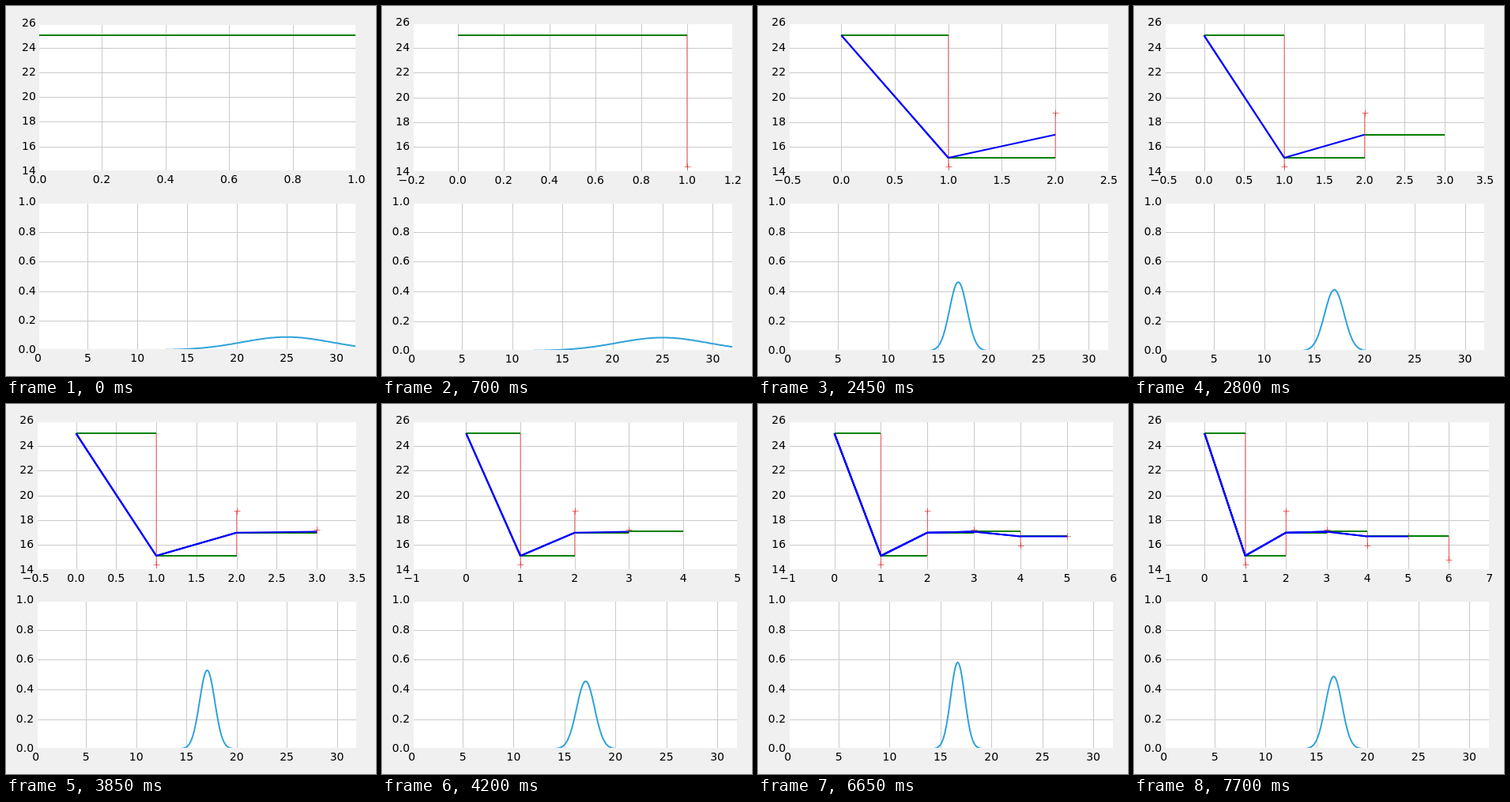
An HTML page for the animation above (8000 ms loop, 468x468 px).

```html
<!DOCTYPE html>
<html lang="en">
<head>
<meta charset="utf-8">
<title>Filter steps</title>
<style>
html, body { margin: 0; width: 100%; height: 100%; overflow: hidden; background: #f0f0f0; }
svg { display: block; width: 100%; height: 100%; }
text { font: 14px "DejaVu Sans", sans-serif; fill: #000; }
.grid { stroke: #cbcbcb; }
.frame { fill: none; stroke: #f0f0f0; stroke-width: 3; }
.prior { stroke: #008000; stroke-width: 2; }
.post { fill: none; stroke: #00f; stroke-width: 2; stroke-linejoin: round; }
.pdf { fill: none; stroke: #30a2da; stroke-width: 2; stroke-linejoin: round; }
.mark { fill: none; stroke: #e00000; stroke-width: .55; }
.resid { stroke: #f00; stroke-opacity: .6; }
</style>
</head>
<body>
<svg id="stage" viewBox="0 0 468 468"></svg>
<script>
const STEP = 350, LOOP = 8000;
const Q = 0.2, R = 1.44;
const measured = [14.42, 18.73, 17.2, 15.96, 16.69, 14.81];
const xRanges = [
  [-0.2, 1.2, 0.2], [-0.5, 2.5, 0.5], [-0.5, 3.5, 0.5],
  [-1, 5, 1], [-1, 6, 1], [-1, 7, 1]
];

// One-dimensional Kalman filter: prior and posterior for every step
const steps = [];
let mean = 25, variance = 20;
for (const z of measured) {
  const prior = { mean, variance: variance + Q };
  const gain = prior.variance / (prior.variance + R);
  mean = prior.mean + gain * (z - prior.mean);
  variance = (1 - gain) * prior.variance;
  steps.push({ z, prior, post: { mean, variance } });
}

const stage = document.getElementById("stage");
const snap = v => Math.round(v) + 0.5;
const scale = (d0, d1, p0, p1) => v => p0 + (v - d0) / (d1 - d0) * (p1 - p0);
const line = (cls, x1, y1, x2, y2) =>
  `<line class="${cls}" x1="${x1}" y1="${y1}" x2="${x2}" y2="${y2}"/>`;
const label = (s, x, y, anchor) =>
  `<text x="${x}" y="${Math.round(y)}" text-anchor="${anchor}">${s}</text>`;
const path = (cls, pts) =>
  `<path class="${cls}" d="M${pts.map(p => p.map(v => v.toFixed(2)).join(" ")).join("L")}"/>`;
const format = (v, digits) => v.toFixed(digits).replace("-", "\u2212");

function ticks([lo, hi, gap]) {
  const n = Math.floor((hi - lo) / gap + 1e-6);
  return Array.from({ length: n + 1 }, (_, i) => {
    const v = Math.round((lo + i * gap) * 10) / 10;
    return v === 0 ? 0 : v;
  });
}

function chart(box, xr, yr, draw) {
  const { left, right, top, bottom } = box;
  const X = scale(xr[0], xr[1], left, right);
  const Y = scale(yr[0], yr[1], bottom, top);
  const digits = r => r[2] < 1 ? 1 : 0;
  const l = snap(left), r = snap(right), t = snap(top), b = snap(bottom);
  let grid = "", text = "";
  for (const v of ticks(xr)) {
    grid += line("grid", snap(X(v)), t, snap(X(v)), b);
    text += label(format(v, digits(xr)), X(v), bottom + 15, "middle");
  }
  for (const v of ticks(yr)) {
    grid += line("grid", l, snap(Y(v)), r, snap(Y(v)));
    text += label(format(v, digits(yr)), left - 2.6, Y(v) + 4.03, "end");
  }
  const size = `x="${l}" y="${t}" width="${r - l}" height="${b - t}"`;
  const id = "clip" + Math.round(yr[1]);
  return `<clipPath id="${id}"><rect ${size}/></clipPath><rect ${size} fill="#fff"/>` + grid +
    `<g clip-path="url(#${id})">${draw(X, Y)}</g><rect class="frame" ${size}/>` + text;
}

function track(X, Y, n, phase) {
  let under = "", over = "";
  const pts = [[X(0), Y(25)]];
  for (let i = 0; i <= n; i++) {
    const { z, prior, post } = steps[i];
    const shown = i < n ? 3 : phase;
    const x = X(i + 1), y = Math.round(Y(prior.mean));
    over += line("prior", Math.round(X(i)), y, Math.round(x), y);
    if (shown > 0) {
      const mx = snap(x), my = snap(Y(z));
      under += `<path class="mark" d="M${mx - 4} ${my}h8M${mx} ${my - 4}v8"/>`;
    }
    if (shown > 1) under += line("resid", x, Y(prior.mean), x, Y(z));
    if (shown > 2) {
      pts.push([x, Y(post.mean)]);
      over += path("post", pts);
    }
  }
  return under + over;
}

function density(X, Y, { mean, variance }) {
  const pts = [];
  for (let v = 0; v <= 32.01; v += 0.1) {
    const p = Math.exp(-((v - mean) ** 2) / (2 * variance)) / Math.sqrt(2 * Math.PI * variance);
    pts.push([X(v), Y(p)]);
  }
  return path("pdf", pts);
}

// The margins follow the width of the outer tick labels
function layout(k, n) {
  if (k === 0) return { left: 40.4, right: 443.2, top: 21.8, height: 186.9, lower: 248.4 };
  const right = n < 2 ? 443.8 : n < 3 ? 444 : 449.8;
  return { left: 37.72, right, top: 21.45, height: 188.15, lower: 248 };
}

function render(k) {
  const n = k >> 2, phase = k & 3;
  const { left, right, top, height, lower } = layout(k, n);
  const box = y => ({ left, right, top: y, bottom: y + height });
  const belief = phase === 3 ? steps[n].post : steps[n].prior;
  stage.innerHTML =
    chart(box(top), k ? xRanges[n] : [0, 1, 0.2], [14, 26, 2], (X, Y) => track(X, Y, n, phase)) +
    chart(box(lower), [0, 32, 5], [0, 1, 0.2], (X, Y) => density(X, Y, belief));
}

let current = -1;
const start = performance.now();
function tick() {
  const k = Math.floor((performance.now() - start) % LOOP / STEP);
  if (k !== current) render(current = k);
  requestAnimationFrame(tick);
}
tick();
</script>
</body>
</html>
```
